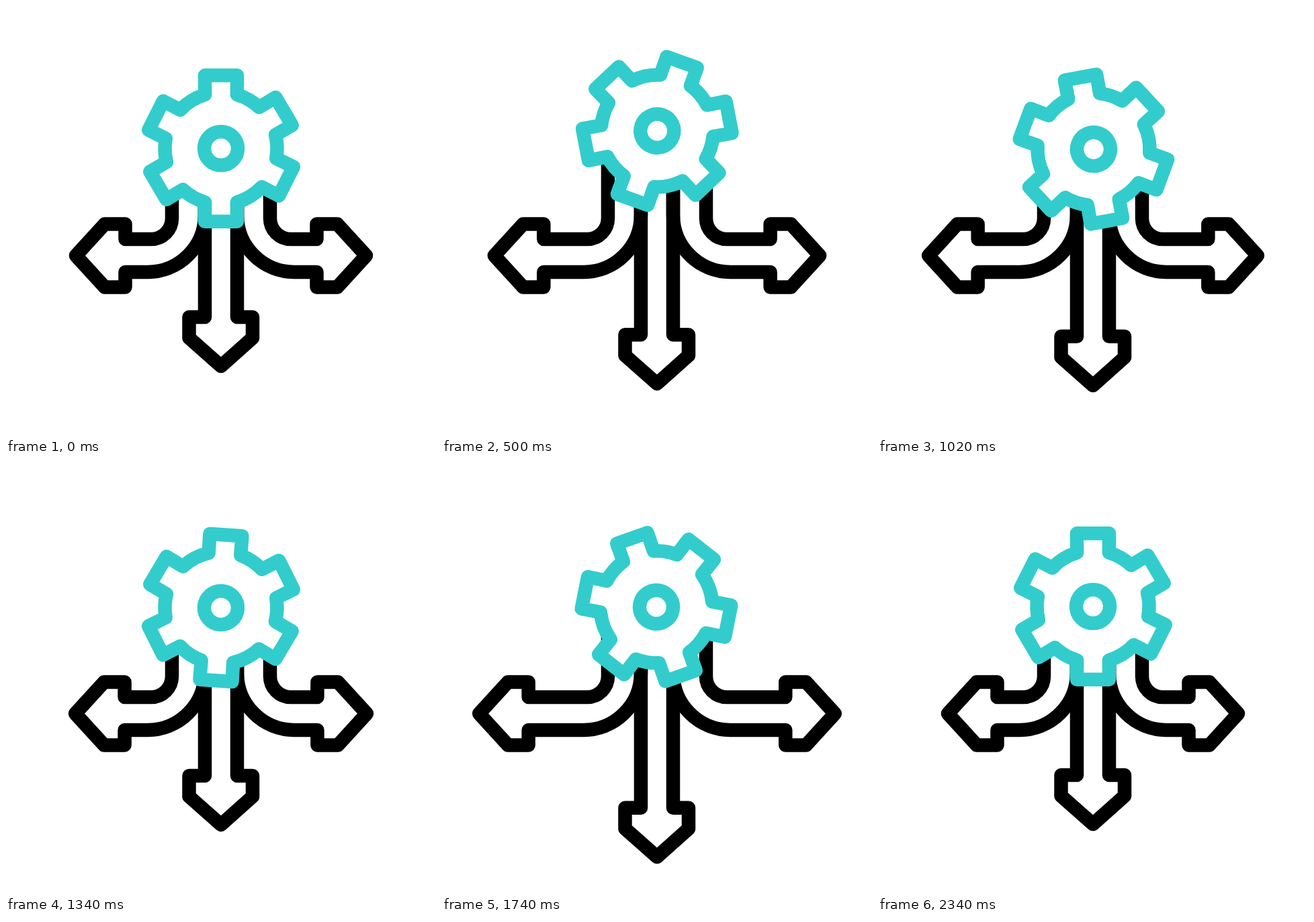
An HTML page with a canvas for the animation above (2.4 s loop, 640 by 640 pixels).

```html
<!DOCTYPE html>
<html lang="en">
<head>
<meta charset="utf-8">
<title>Gear and arrows</title>
<style>
html, body { margin: 0; height: 100%; overflow: hidden; background: #fff; }
canvas { display: block; }
</style>
</head>
<body>
<canvas id="stage" width="640" height="640"></canvas>
<script>
const ctx = document.getElementById('stage').getContext('2d');
const LOOP = 2400;
const rad = Math.PI / 180;

// Tracks are [time in ms, value] pairs.
const stretch = [[220, 0], [780, 52], [1300, 0], [1820, 52], [2340, 0]];
const lift = [[220, 0], [780, 52], [1030, 0], [1820, 0], [2080, 39], [2340, 0]];
const spin = [[200, 0], [500, 19.7], [820, 69.7], [1020, 110.1], [1340, 183.7], [1740, 281], [2340, 360]];

// Tangent at key i: flat at the ends and at turning points.
function tangent(keys, i) {
  if (i === 0 || i === keys.length - 1) return 0;
  const [[t0, v0], [t1, v1], [t2, v2]] = keys.slice(i - 1, i + 2);
  const before = (v1 - v0) / (t1 - t0);
  const after = (v2 - v1) / (t2 - t1);
  if (before * after <= 0) return 0;
  return (before * (t2 - t1) + after * (t1 - t0)) / (t2 - t0);
}

// Cubic Hermite interpolation through the keys.
function sample(keys, time) {
  const last = keys.length - 1;
  if (time <= keys[0][0]) return keys[0][1];
  if (time >= keys[last][0]) return keys[last][1];
  const i = keys.findIndex(key => key[0] > time) - 1;
  const [t0, v0] = keys[i];
  const [t1, v1] = keys[i + 1];
  const span = t1 - t0;
  const p = (time - t0) / span;
  const q = 1 - p;
  return v0 * q * q * (1 + 2 * p) + v1 * p * p * (3 - 2 * p)
    + span * p * q * (q * tangent(keys, i) - p * tangent(keys, i + 1));
}

function lines(...points) {
  for (const [x, y] of points) ctx.lineTo(x, y);
}

function sideArrow(top, ext, mirrored) {
  ctx.save();
  if (mirrored) {
    ctx.translate(640, 0);
    ctx.scale(-1, 1);
  }
  ctx.beginPath();
  ctx.moveTo(247, top);
  ctx.arcTo(247, 347, 217, 347, 31);
  lines([177.5 - ext, 347], [177.5 - ext, 324.5], [147 - ext, 324.5], [104 - ext, 371.5],
    [147 - ext, 418.5], [177.5 - ext, 418.5], [177.5 - ext, 396]);
  ctx.arcTo(296, 396, 296, 311, 85);
  ctx.lineTo(296, top);
  ctx.stroke();
  ctx.restore();
}

function downArrow(top, ext) {
  ctx.beginPath();
  lines([296, top], [296, 463 + ext], [272.5, 463 + ext], [272.5, 494 + ext], [320, 536 + ext],
    [367, 494 + ext], [367, 463 + ext], [344, 463 + ext], [344, top]);
  ctx.stroke();
}

function gear(y, degrees) {
  ctx.save();
  ctx.translate(320, y);
  ctx.rotate(degrees * rad);
  ctx.translate(0, -1);
  ctx.beginPath();
  let previous = -153.2;
  for (const angle of [-90, -30.6, 26.8, 90, 149.4, 206.8]) {
    ctx.arc(0, 0, 83.5, (previous + 16.6) * rad, (angle - 16.6) * rad);
    for (const side of [-12.5, 12.5]) {
      const a = (angle + side) * rad;
      ctx.lineTo(111.3 * Math.cos(a), 111.3 * Math.sin(a));
    }
    previous = angle;
  }
  ctx.closePath();
  ctx.fill();
  ctx.stroke();
  ctx.beginPath();
  ctx.arc(0, 0, 25, 0, 2 * Math.PI);
  ctx.stroke();
  ctx.restore();
}

function draw(now) {
  const time = now % LOOP;
  const ext = sample(stretch, time);
  const gearY = 213 - sample(lift, time);

  ctx.fillStyle = '#fff';
  ctx.fillRect(0, 0, 640, 640);
  ctx.lineWidth = 20.5;
  ctx.lineJoin = 'round';

  ctx.strokeStyle = '#000';
  sideArrow(gearY, ext, false);
  sideArrow(gearY, ext, true);
  downArrow(gearY, ext);

  ctx.strokeStyle = '#33cccc';
  gear(gearY, sample(spin, time));

  requestAnimationFrame(draw);
}
requestAnimationFrame(draw);
</script>
</body>
</html>
```
